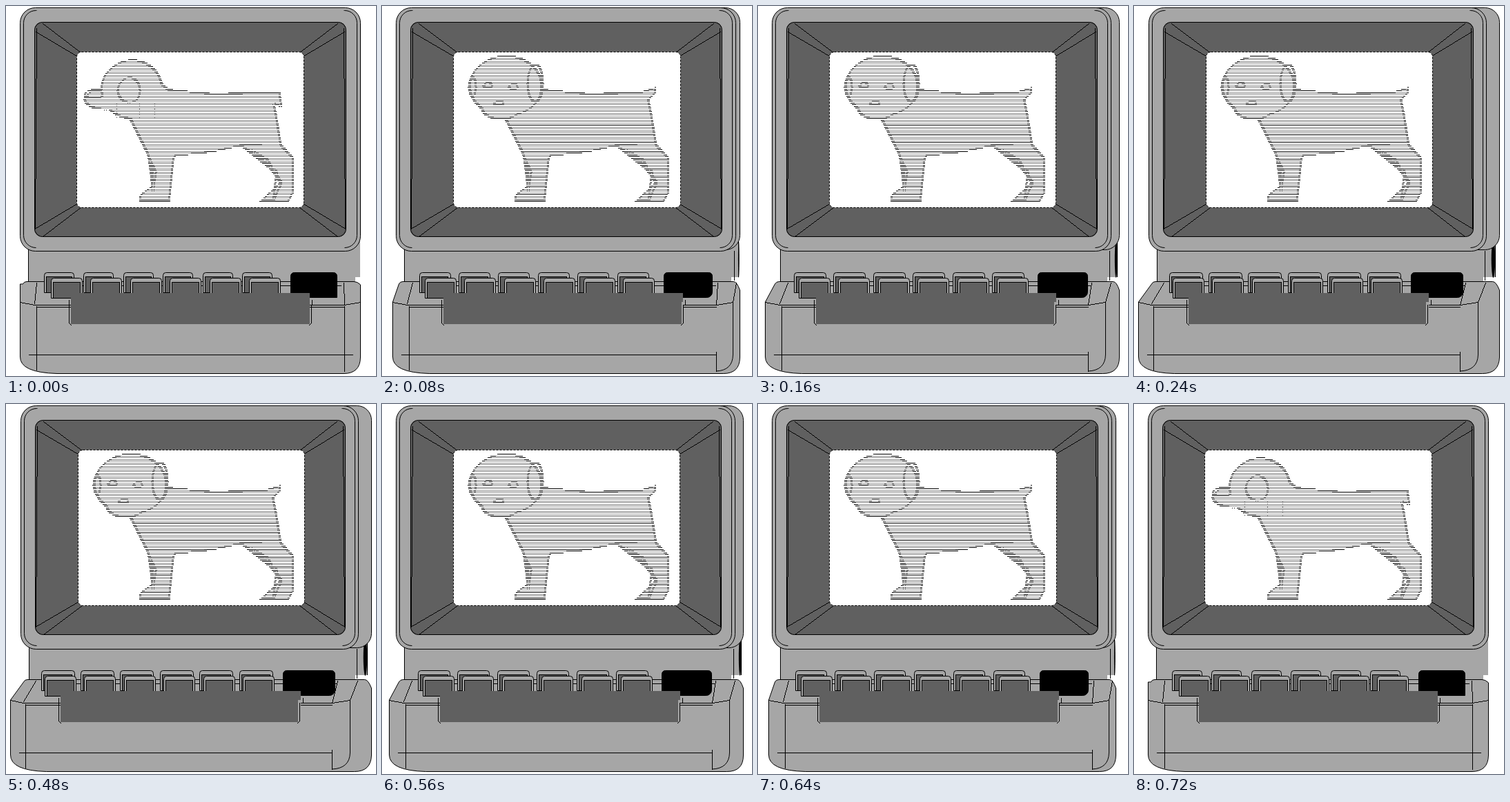
Animation of 536 by 535 pixels, one loop 0.8 s. Source, as an HTML page with a canvas:

```html
<!DOCTYPE html>
<html lang="en">
<head>
<meta charset="utf-8">
<title>Turning terminal</title>
<style>
html, body { margin: 0; width: 100%; height: 100%; overflow: hidden; background: #fff; }
canvas { display: block; }
</style>
</head>
<body>
<canvas id="stage" width="536" height="535"></canvas>
<script>
const stage = document.getElementById('stage').getContext('2d');
const LIGHT = '#a6a6a6', DARK = '#606060', INK = '#000';
const LOOP = 800, STEP = 80, MAX_TURN = 4, ROW = 2.5;
let ctx = stage;

const snap = v => Math.round(v) + 0.5;

// Hard-edged line through x, y pairs.
function line(...p) {
  ctx.fillStyle = INK;
  for (let i = 0; i + 3 < p.length; i += 2) {
    const [x0, y0, x1, y1] = p.slice(i, i + 4).map(Math.round);
    const dx = x1 - x0, dy = y1 - y0;
    if (!dx || !dy) {
      ctx.fillRect(Math.min(x0, x1), Math.min(y0, y1), Math.abs(dx) + 1, Math.abs(dy) + 1);
      continue;
    }
    const n = Math.max(Math.abs(dx), Math.abs(dy));
    for (let k = 0; k <= n; k++) {
      ctx.fillRect(Math.round(x0 + dx * k / n), Math.round(y0 + dy * k / n), 1, 1);
    }
  }
}

function box(l, t, r, b, radius, fill) {
  ctx.beginPath();
  ctx.roundRect(snap(l), snap(t), Math.round(r - l), Math.round(b - t), radius);
  ctx.fillStyle = fill;
  ctx.fill();
  ctx.stroke();
}

function rect(l, t, r, b, color) {
  ctx.fillStyle = color;
  ctx.fillRect(Math.round(l), t, Math.round(r) - Math.round(l), b - t);
}

// Vertical line whose ends curl inwards.
function bracket(x, top, bottom, dir) {
  const sx = snap(x), end = sx + 19 * dir;
  ctx.beginPath();
  ctx.moveTo(end, top + .5);
  ctx.arcTo(sx, top + .5, sx, top + 19, 18);
  ctx.arcTo(sx, bottom + .5, end, bottom + .5, 18);
  ctx.stroke();
}

function polygon(...p) {
  const path = new Path2D();
  for (let i = 0; i < p.length; i += 2) path.lineTo(p[i], p[i + 1]);
  path.closePath();
  return path;
}

function oval(x, y, rx, ry) {
  const path = new Path2D();
  path.ellipse(x, y, rx, ry, 0, 0, 7);
  return path;
}

// Scans a union of shapes row by row; edges become short black dashes.
function scan(shapes, shade) {
  const inside = (x, y) => shapes.some(s => ctx.isPointInPath(s, x, y));
  for (let k = 0; k < 86; k++) {
    const y = Math.round(72 + k * ROW);
    for (let x = 110; x < 422; x++) {
      const here = inside(x, y);
      const edge = here !== inside(x + 3, y) || here !== inside(x, y + ROW);
      if (!edge && !(here && shade)) continue;
      ctx.fillStyle = edge ? INK : shade(y, k);
      ctx.fillRect(x, y, 1, 1);
    }
  }
}

function makeDog(front) {
  const canvas = document.createElement('canvas');
  canvas.width = 536;
  canvas.height = 535;
  ctx = canvas.getContext('2d');

  const torso = polygon(210,100, 236,122, 300,128, 386,126, 393,165, 399,202,
    340,202, 300,211, 245,217, 208,217, 182,165);
  const foreleg = polygon(207,212, 244,214, 237,282, 196,282, 195,274, 213,260);
  const hindleg = polygon(343,203, 399,202, 416,220, 416,270, 409,283, 370,282, 398,256, 386,237);
  const tail = front ? polygon(372,127, 397,119, 397,126, 384,138)
    : polygon(372,126, 397,127, 400,146, 384,140);
  const head = front ? [oval(181, 116, 52, 43), oval(174, 148, 27, 16)]
    : [oval(183, 121, 44, 42), oval(145, 135, 30, 15)];
  const shade = (y, k) => front && y > 160 && k % 5 === 0 ? '#222' : '#888';

  scan([torso, foreleg, hindleg, tail, ...head], shade);
  scan([polygon(207,218, 213,236, 214,268, 218,240)]);
  scan([polygon(352,207, 380,223, 400,256, 388,282, 393,240)]);
  if (front) {
    scan(head);
    scan([oval(224, 112, 11, 27)]);
    scan([oval(133, 117, 5, 13)]);
    scan([oval(155, 115, 6, 4)]);
    scan([oval(192, 117, 6, 4)]);
    scan([oval(171, 141, 8, 2)]);
  } else {
    scan([oval(179, 122, 16, 18)]);
    scan([oval(128, 128, 13, 6)]);
    for (const x of [160, 193, 215]) {
      for (let y = 140; y < 163; y += 4) rect(x, y, x + 1, y + 2, '#888');
    }
  }
  ctx = stage;
  return canvas;
}

function drawLid(turn) {
  const late = Math.max(0, turn - 2);
  const l = 20 + late, r = 513 - turn;
  if (turn) box(60, 2, 513 + 5.2 * turn, 352, 21, LIGHT);
  box(l, 2, r, 354, 22, LIGHT);
  bracket(l + 5, 6, 349, 1);
  bracket(r - 5, 6, 349, -1);

  const bl = 41 + late / 2, br = 492 - turn / 2;
  const sl = 102 + turn / 2, sr = 431, mid = 179;
  box(bl, 23, br, 333, 11, INK);
  ctx.strokeStyle = DARK;
  box(bl + 1, 24, br - 1, 332, 10, DARK);
  ctx.strokeStyle = INK;
  line(bl + 3, 32, bl + 1, 322);
  line(br - 3, 32, br - 1, 322);
  for (const dir of [-1, 1]) {
    const outer = mid + dir * 154, inner = mid + dir * 112;
    line(bl + 2, outer - dir * 12, sl, inner - dir * 5);
    line(bl + 12, outer, sl + 6, inner);
    line(br - 2, outer - dir * 12, sr, inner - dir * 5);
    line(br - 12, outer, sr - 6, inner);
  }
  ctx.setLineDash([3, 2]);
  box(sl, 66, sr, 291, 7, '#fff');
  ctx.setLineDash([]);
  ctx.drawImage(turn ? dogFront : dogSide, turn ? Math.floor(turn / 3) - 1 : 0, 0);
}

function drawNeck(turn) {
  const l = 32 + Math.max(0, turn - 2), r = 513 + 3.3 * turn;
  rect(l, 340, 506, 400, LIGHT);
  rect(500, 340, r, 392, LIGHT);
  line(l, 352, l, 397);
  if (!turn) return;
  line(r, 340, r, 391);
  line(511 - turn, 354, 511 - turn, 396);
  ctx.fillStyle = INK;
  ctx.fill(oval(515 + 1.8 * turn, 366, turn * .9, 27));
}

function drawBase(turn) {
  const l = 20 - 5 * turn + .12 * turn * turn, r = 513 + 5.2 * turn;
  const edge = 490 - 6 * turn, side = 513 - 5 * turn, inner = 44 - 5.2 * turn;
  const top = l + 4 + 5 * turn;
  ctx.beginPath();
  ctx.moveTo(snap(l), turn ? 428 : 402);
  ctx.lineTo(snap(top), 402);
  ctx.quadraticCurveTo(top + 2, 398.5, top + 6, 398.5);
  ctx.lineTo(r - 9, 398.5);
  ctx.quadraticCurveTo(r - 4, 398.5, snap(r), turn ? 411 : 403);
  ctx.lineTo(snap(r), 508);
  ctx.quadraticCurveTo(r, 531.5, r - 24, 531.5);
  ctx.lineTo(inner + 30, 531.5);
  ctx.quadraticCurveTo(l, 530, snap(l), 507);
  ctx.closePath();
  ctx.fillStyle = LIGHT;
  ctx.fill();
  ctx.stroke();

  const trayL = 94 - 5 * turn, trayR = 440 - 4.25 * turn;
  line(inner, 434, inner, 526);
  line(edge, turn ? 500 : 434, edge, 528);
  line(l + 13, 504, edge + (turn ? 0 : 12), 504);
  line(l, 428, inner - 3, 432, trayL, 432);
  line(inner, 435, trayL, 435);
  line(trayR, 432, edge, 432, side, 428);
  line(trayR, 435, edge, 435);
  line(44 - .5 * turn, 400, inner - 3, 430);
  line(489 - 3 * turn, 400, edge, 432);
  if (!turn) return;
  line(side, 428, 515 - 2 * turn, 400);
  ctx.beginPath();
  ctx.moveTo(snap(side), 428);
  ctx.lineTo(snap(side), 504);
  ctx.quadraticCurveTo(side, 527, edge, 528);
  ctx.stroke();
}

function drawKey(x, y, w) {
  box(x, y, x + w, y + 29, [4, 4, 0, 0], LIGHT);
  rect(x + 3, y + 7, x + w - 2, y + 29, DARK);
  line(x + 3, y + 29, x + 3, y + 6, x + w - 3, y + 6, x + w - 3, y + 29);
}

function drawKeys(turn) {
  line(56, 404, 485 - 2 * turn, 404);
  for (let i = 0; i < 6; i++) {
    const x = i * 57.4;
    drawKey(55 - 1.5 * turn + x, 385, 43 + turn * 1.6);
    drawKey(65 - 3 * turn + x, 393, 45);
  }
  box(412 - 3.7 * turn, 385, 479 - turn, 421, turn ? [5, 5, 8, 5] : [5, 5, 0, 0], INK);
}

function drawTray(turn) {
  const l = 94 - 5 * turn, r = 440 - 4.25 * turn, low = r - 1.5 * turn;
  line(l - 3, 425, l - 3, 458, l, 461);
  line(r + 3, 425, r + 3, 432);
  line(low + 2, 432, low + 2, 458, low - 1, 461);
  rect(l, 415, r, 428, DARK);
  rect(l, 428, low, 460, DARK);
}

function draw(now) {
  const step = Math.floor(now % LOOP / STEP);
  const turn = Math.min(step, MAX_TURN, LOOP / STEP - 1 - step);
  rect(0, 0, 536, 535, '#fff');
  drawNeck(turn);
  drawLid(turn);
  drawBase(turn);
  drawKeys(turn);
  drawTray(turn);
  requestAnimationFrame(draw);
}

const dogSide = makeDog(false), dogFront = makeDog(true);
requestAnimationFrame(draw);
</script>
</body>
</html>
```
